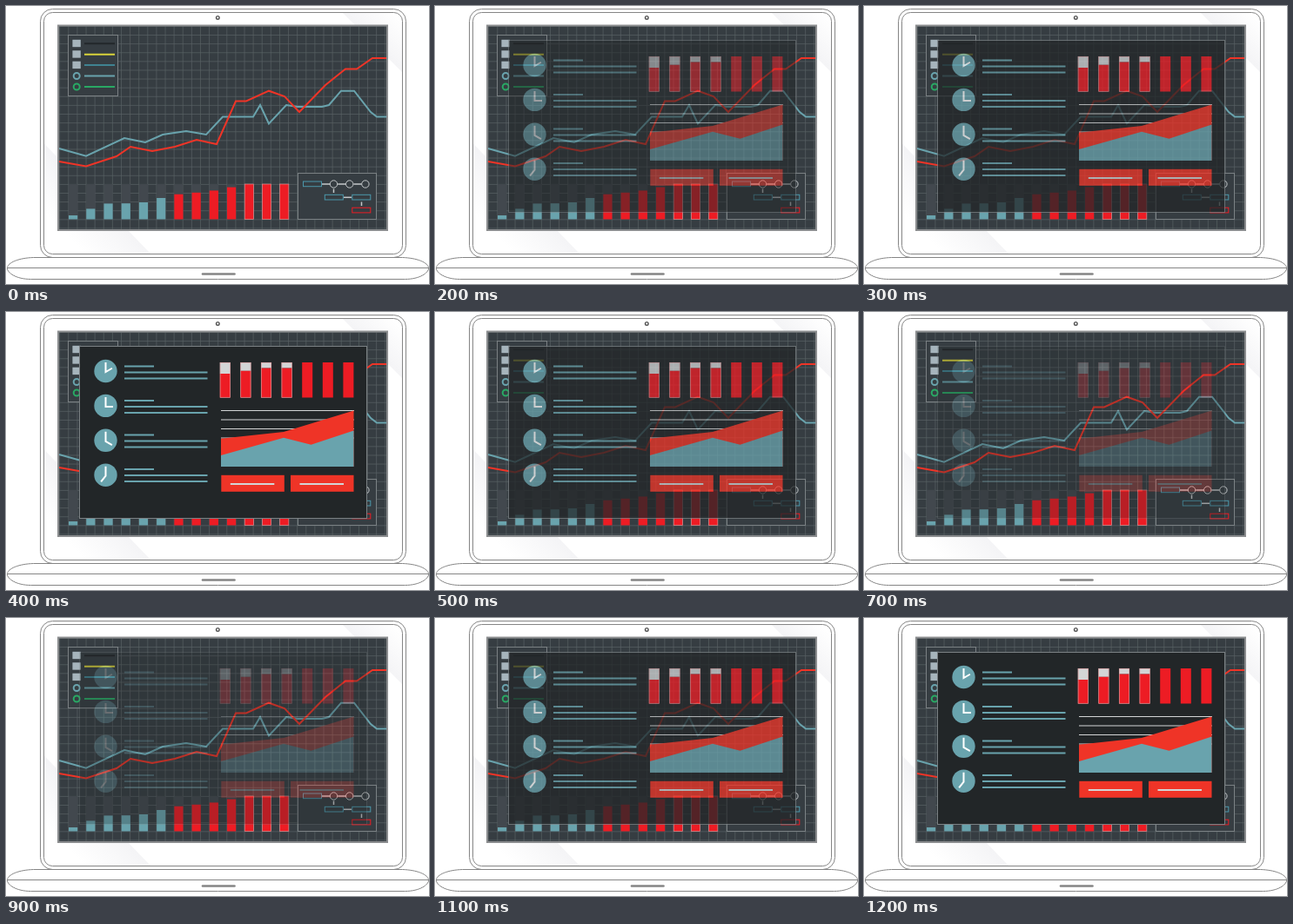
An HTML page with a canvas for the animation above (1.3 s loop, 486 by 320 pixels).

```html
<!DOCTYPE html>
<html lang="en">
<head>
<meta charset="utf-8">
<title>Laptop dashboard</title>
<style>
html, body { margin: 0; width: 100%; height: 100%; overflow: hidden; background: #fff; }
canvas { display: block; width: 486px; height: 320px; }
</style>
</head>
<body>
<canvas id="stage" width="486" height="320"></canvas>
<script>
const W = 486, H = 320, LOOP = 1300, STEP = 100;
const TEAL = '#69a3ad', RED = '#ef3427', BAR = '#ed1c24', EDGE = '#7b8184';
const PANEL = '#363d42', DARK = '#222628', PALE = '#d3d5d6', GREY = '#858585';
const GRID = 10.11;
const stage = document.getElementById('stage').getContext('2d');

function layer(draw) {
  const c = document.createElement('canvas');
  c.width = W;
  c.height = H;
  draw(c.getContext('2d'));
  return c;
}

function trace(g, pts) {
  g.beginPath();
  for (let i = 0; i < pts.length; i += 2) g.lineTo(pts[i], pts[i + 1]);
}

function line(g, color, width, ...pts) {
  trace(g, pts);
  g.strokeStyle = color;
  g.lineWidth = width;
  g.stroke();
}

function poly(g, color, ...pts) {
  trace(g, pts);
  g.fillStyle = color;
  g.fill();
}

function rect(g, color, x, y, w, h) {
  g.fillStyle = color;
  g.fillRect(x, y, w, h);
}

function frame(g, color, x, y, w, h, width = 1) {
  g.strokeStyle = color;
  g.lineWidth = width;
  g.strokeRect(x, y, w, h);
}

function ring(g, color, x, y, r, width) {
  g.beginPath();
  g.arc(x, y, r, 0, Math.PI * 2);
  g.strokeStyle = color;
  g.lineWidth = width;
  g.stroke();
}

function shell(g, x, y, w, h, r) {
  g.beginPath();
  g.roundRect(x, y, w, h, r);
  g.strokeStyle = GREY;
  g.lineWidth = 1;
  g.stroke();
}

// Diagonal glint that fades out away from its edge.
function shine(g, x, y, dx, ...pts) {
  const fade = g.createLinearGradient(x, y, x + dx, y - dx);
  fade.addColorStop(0, '#f4f4f6');
  fade.addColorStop(1, '#ffffff');
  poly(g, fade, ...pts);
}

// One half of the base, from its middle to its rounded tip and back.
function foot(g, side) {
  const mid = 243.5, x = d => mid + side * d;
  g.beginPath();
  g.moveTo(mid, 289.5);
  g.lineTo(x(212), 289.5);
  g.bezierCurveTo(x(228), 290, x(242), 295, x(242), 302);
  g.bezierCurveTo(x(242), 307, x(232), 314.5, x(215), 314.5);
  g.lineTo(mid, 314.5);
  g.strokeStyle = GREY;
  g.lineWidth = 1;
  g.stroke();
}

function laptop(g) {
  rect(g, '#fff', 0, 0, W, H);
  shine(g, 421, 42, 30, 386, 7, 448, 7, 456, 15, 456, 77);
  shine(g, 104, 222, -38, 43.5, 158, 43.5, 276, 53, 286, 167, 286);
  shell(g, 39.5, 3.5, 420, 286, 14);
  shell(g, 43.5, 7.5, 412, 278, 10);
  ring(g, '#555', 243.3, 13.4, 1.8, 1.4);
  foot(g, -1);
  foot(g, 1);
  line(g, GREY, 1, 1.5, 301.5, 485.5, 301.5);
  g.lineCap = 'round';
  line(g, GREY, 2.6, 226, 308.5, 262.5, 308.5);
  g.lineCap = 'butt';
}

function legend(g) {
  rect(g, PANEL, 71.5, 33.5, 57, 70);
  frame(g, EDGE, 71.5, 33.5, 57, 70);
  const colors = ['#22272a', '#d9d43a', '#3f8291', TEAL, '#29a864'];
  colors.forEach((color, i) => {
    const y = 43.2 + i * 12.45;
    if (i < 3) rect(g, '#a6b4bc', 76.4, y - 4.4, 9.4, 8.4);
    else ring(g, color, 81.2, y, 3.5, 2);
    line(g, color, 2, 90, y, 125, y);
  });
}

function flow(g) {
  const pale = '#c4c8ca', blue = '#4b98ab';
  const box = (color, x, y) => frame(g, color, x, y, 21, 5.7);
  const link = (x, y, dx, dy) => line(g, pale, 1.5, x, y, x + dx, y + dy);
  rect(g, PANEL, 335.5, 192.5, 90, 53);
  frame(g, EDGE, 335.5, 192.5, 90, 53);
  box(blue, 341.5, 202);
  for (let i = 0; i < 3; i++) {
    const x = 376.5 + i * 18.2;
    ring(g, pale, x, 205, 4.2, 1);
    link(x - 13.5, 205, 9, 0);
  }
  link(376.5, 210.5, 0, 4.5);
  box(blue, 366.3, 217.3);
  link(388, 220.3, 9, 0);
  box(blue, 397.8, 217.3);
  link(408.5, 225.5, 0, 4.5);
  box(BAR, 397.8, 232.2);
}

// Rising bars with a wobble that dies down.
function bars(g) {
  const full = 40.5, floor = 245.5, w = 10.2;
  for (let i = 0; i < 13; i++) {
    const x = 72 + i * 2 * GRID;
    const wobble = 4.5 * Math.cos(i * Math.PI / 2) * 0.8 ** i;
    const h = Math.min(full, 9 + 3.1 * i - wobble);
    rect(g, '#42484e', x, floor - full, w, full);
    rect(g, i < 6 ? TEAL : BAR, x, floor - h, w, h);
    if (i > 9) frame(g, '#dc9496', x, floor - full, w, full, 0.7);
  }
}

function dashboard(g) {
  rect(g, PANEL, 60, 22, 378, 236);
  for (let x = 61.7; x < 438; x += GRID) line(g, '#596265', 0.7, x, 23, x, 257);
  for (let y = 23.4; y < 257; y += GRID) line(g, '#596265', 0.7, 61, y, 438, y);
  bars(g);
  line(g, TEAL, 2, 61, 164, 92, 172.6, 136, 152, 160, 157, 180, 148, 207, 144, 230, 148,
    249, 127.6, 284, 127.6, 292, 114, 302, 135.5, 322, 114, 335, 116, 363, 116,
    371, 114, 385, 97.7, 400, 97.7, 419, 122, 426, 127.6, 438, 127.6);
  line(g, RED, 2, 61, 179, 92, 184.4, 127, 173, 143, 162, 168, 167, 194, 162, 219, 154,
    242, 159, 264, 109.5, 276, 109.5, 302, 97.7, 320, 104, 337, 122, 367, 91,
    390, 72.5, 403, 72.5, 421, 60, 438, 60);
  legend(g);
  flow(g);
  frame(g, '#8b8d8f', 60, 22.5, 378, 235.5, 2);
}

function clock(g, x, y, hour) {
  const a = (hour - 3) * Math.PI / 6;
  g.beginPath();
  g.arc(x, y, 13.2, 0, Math.PI * 2);
  g.fillStyle = TEAL;
  g.fill();
  line(g, '#fff', 2, x, y - 10, x, y + 1, x + 8.5 * Math.cos(a), y + 1 + 8.5 * Math.sin(a));
}

function agenda(g) {
  [2, 3, 4, 7.3].forEach((hour, row) => {
    clock(g, 114.5, 68 + row * 39.9, hour);
    for (let i = 0; i < 3; i++) {
      const y = 62.5 + row * 39.5 + i * 7;
      line(g, TEAL, 2, 136, y, i ? 231.5 : 170, y);
    }
  });
}

function gauges(g) {
  for (let i = 0; i < 7; i++) {
    const x = 245.8 + i * 23.6;
    const level = i < 4 ? 71 - 3.2 * Math.min(i, 2) : 58;
    rect(g, PALE, x, 58, 12, level - 58);
    rect(g, BAR, x, level, 12, 98.5 - level);
    if (i < 4) frame(g, '#dc9c9e', x + 0.3, 58.3, 11.4, 40, 0.7);
  }
}

function area(g, color, ...pts) {
  poly(g, color, 247, 178, ...pts, 399.5, 178);
}

function popup(g) {
  rect(g, DARK, 84.5, 39.5, 330, 198);
  frame(g, EDGE, 84.5, 39.5, 330, 198);
  agenda(g);
  gauges(g);
  for (let i = 0; i < 4; i++) {
    const y = 113.5 + i * 10.5;
    line(g, PALE, 1, 247, y, 400, y);
  }
  area(g, RED, 247, 145.7, 319, 138, 399.5, 113.5);
  area(g, TEAL, 247, 165, 319, 144.8, 350.5, 152.7, 399.5, 136.5);
  for (const x of [247.3, 327]) {
    rect(g, RED, x, 187.8, 72.5, 19);
    line(g, PALE, 2, x + 10.5, 198, x + 61, 198);
  }
}

const base = layer(g => { laptop(g); dashboard(g); });
const panel = layer(popup);

// Four steps in, four steps out, cut off by the loop at full opacity.
function opacity(ms) {
  const phase = Math.floor(ms / STEP) % 8;
  return 1 - Math.abs(phase - 4) / 4;
}

function render(now) {
  stage.globalAlpha = 1;
  stage.drawImage(base, 0, 0);
  stage.globalAlpha = opacity(now % LOOP);
  stage.drawImage(panel, 0, 0);
}

const start = performance.now();
function tick() {
  render(performance.now() - start);
  requestAnimationFrame(tick);
}
tick();
</script>
</body>
</html>
```
